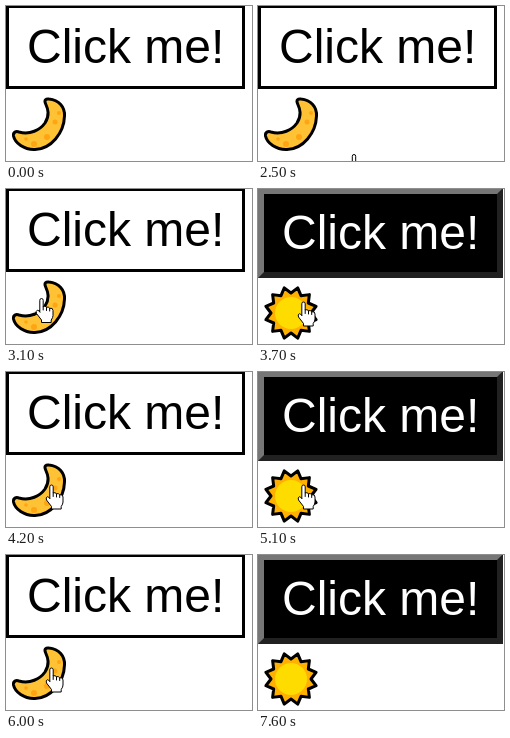
Animation, 246 px wide and 155 px high, one loop 8.9 s. Source, as an HTML page:

```html
<!DOCTYPE html>
<html lang="en">
<head>
<meta charset="utf-8">
<style>
  html, body { margin: 0; width: 100%; height: 100%; overflow: hidden; background: #fff; }
  #button {
    position: absolute; left: 0; top: -1px; box-sizing: border-box;
    width: 239px; height: 84px; padding: 11px 0 0 18px;
    border: 3px solid #000; background: #fff; color: #000;
    font: 48px/55px "Liberation Sans", Arial, sans-serif; white-space: nowrap;
  }
  #button.dark {
    width: 245px; height: 90px;
    border: 6px outset #767676; background: #000; color: #fff;
  }
  svg { position: absolute; left: 0; top: 0; }
</style>
</head>
<body>
<div id="button">Click me!</div>
<svg width="246" height="155" stroke-linejoin="round" stroke-linecap="round">
  <g id="moon">
    <path fill="#ffc234" stroke="#000" stroke-width="3" d="M43 93C53 94 59 101 58.5 110C58 127 45 143 29 143.5C18 144 9 137 7.5 130C7 126 10 125 13 126C24 129 34 124 39 117C44 109 42 103 39.5 97.5C38 94 40 92.5 43 93Z"/>
    <g fill="#ffa412">
      <circle cx="53" cy="107" r="2"/>
      <circle cx="49" cy="116" r="2.5"/>
      <circle cx="41" cy="131" r="3"/>
      <circle cx="28" cy="138" r="3"/>
      <circle cx="20" cy="133" r="1.8"/>
    </g>
  </g>
  <g id="sun">
    <path id="rays" fill="#ffb000" stroke="#000" stroke-width="3"/>
    <circle cx="33" cy="124" r="16" fill="#ffdc00"/>
  </g>
  <g id="hand" fill="#fff" stroke="#000" stroke-width="1">
    <path d="M-1.7 13V1.8Q-1.7 0 0 0T1.7 1.8V8Q3.5 7 5 8.7Q7 8 8.2 9.8Q11.5 9 11.5 12V17Q11.5 19 9.7 21.5V24H0V21.5L-5 15Q-6 12.5-4.2 11.7Q-3 11.5-1.7 13.5Z"/>
    <path fill="none" d="M1.7 8V11.5M5 9V12M8.2 10V12.5"/>
  </g>
</svg>
<script>
const LOOP = 8900;
const POINTER_END = 7600;
const toggles = [3300, 4200, 5100, 6000, 7600];
// Pointer stops: time, x and y of the fingertip.
const stops = [
  [2500, 96, 148.5], [2600, 80, 128], [2700, 62, 110], [2800, 47, 98],
  [2900, 37, 95], [3000, 34, 102], [3100, 35.5, 109.5],
  [3500, 38, 110], [3600, 42, 111.5], [3700, 45.5, 113]
];
const byId = id => document.getElementById(id);
const show = (id, on) => byId(id).setAttribute("visibility", on ? "visible" : "hidden");

function starPath(cx, cy, outer, inner, spikes) {
  const points = Array.from({ length: spikes * 2 }, (_, i) => {
    const angle = (i + 1) * Math.PI / spikes;
    const r = i % 2 ? inner : outer;
    return `${cx + r * Math.sin(angle)} ${cy - r * Math.cos(angle)}`;
  });
  return `M${points.join("L")}Z`;
}
byId("rays").setAttribute("d", starPath(33, 124, 26, 20, 12));

function frame() {
  const t = performance.now() % LOOP;
  const dark = toggles.filter(time => t >= time).length % 2 === 1;
  byId("button").className = dark ? "dark" : "";
  show("sun", dark);
  show("moon", !dark);
  const stop = stops.filter(([time]) => t >= time).pop();
  const pointing = stop && t < POINTER_END;
  show("hand", pointing);
  if (pointing) byId("hand").setAttribute("transform", `translate(${stop[1]} ${stop[2]})`);
  requestAnimationFrame(frame);
}
frame();
</script>
</body>
</html>
```
